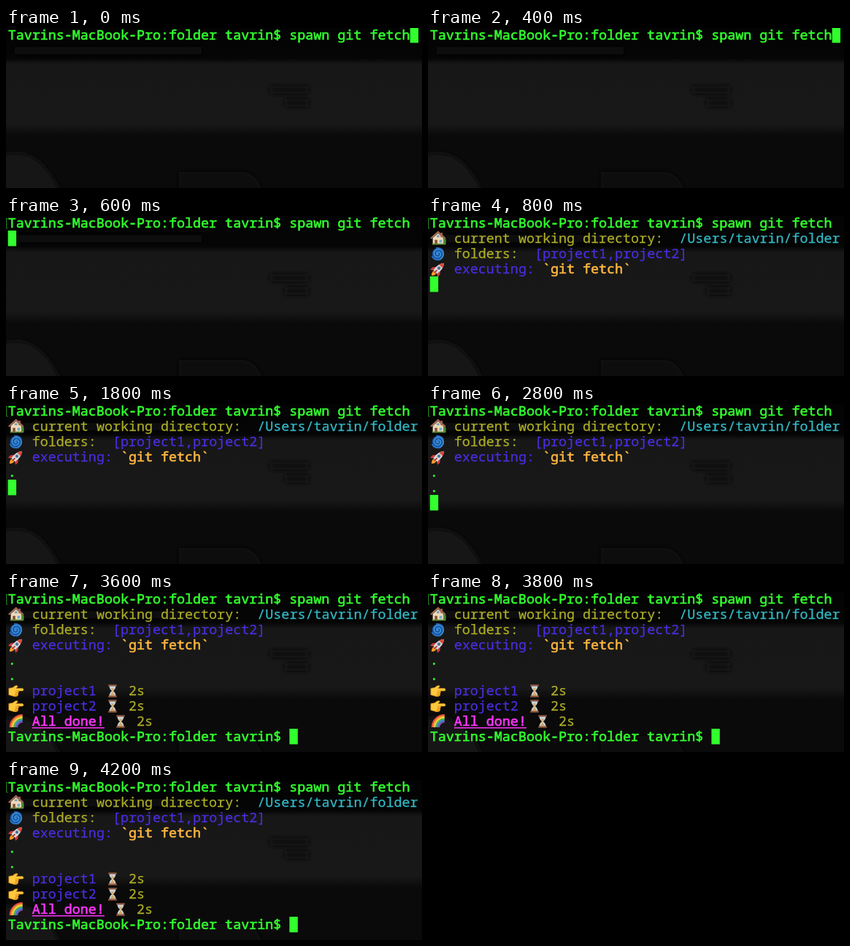
An HTML page for the animation above (4.4 s loop, 570x220 px).

```html
<!DOCTYPE html>
<html lang="en">
<head>
<meta charset="utf-8">
<title>Terminal session</title>
<style>
  html, body { margin: 0; width: 100%; height: 100%; overflow: hidden; background: #050505; }
  svg { display: block; width: 570px; height: 220px; }
  text { font: 18.367px "Noto Sans Mono", "DejaVu Sans Mono", monospace; white-space: pre; }
</style>
</head>
<body>
<svg viewBox="0 0 570 220" xmlns="http://www.w3.org/2000/svg">
  <defs>
    <filter id="soft" x="-20%" y="-50%" width="140%" height="200%"><feGaussianBlur stdDeviation="3"/></filter>
    <linearGradient id="back" x1="0" y1="0" x2="0" y2="220" gradientUnits="userSpaceOnUse">
      <stop offset="0" stop-color="#030303"/>
      <stop offset=".19" stop-color="#050505"/>
      <stop offset=".225" stop-color="#171717"/>
      <stop offset=".6" stop-color="#181818"/>
      <stop offset=".67" stop-color="#0a0a0a"/>
      <stop offset="1" stop-color="#0a0a0a"/>
    </linearGradient>

    <!-- Icons are drawn around their own centre -->
    <g id="house">
      <path d="M7 9V2q3-5 5 0V9z" fill="#4f8a35"/>
      <path d="M-8-1 0-8 8-1V9H-8z" fill="#ead9b9"/>
      <path d="M4-9h3v7H4z" fill="#a5553d"/>
      <path d="M-11 0 0-10 11 0" fill="none" stroke="#a06a55" stroke-width="2.6"/>
      <path d="M-5 2h4v7h-4z" fill="#86512f"/>
      <path d="M2 2h4v4H2z" fill="#6cacd2"/>
      <path d="M-2-5h4v3h-4z" fill="#709fb9"/>
      <path d="M-9 8.5H11" stroke="#5c8c38" stroke-width="2"/>
    </g>
    <g id="swirl" fill="none" stroke-linecap="round">
      <circle r="9" fill="#174f9d"/>
      <path id="coil" stroke="#3b8fd6" stroke-width="2"/>
      <path d="M-9 4Q-5 10 3 9M8-4Q5-9-2-9" stroke="#286fc6" stroke-width="2"/>
    </g>
    <g id="rocket" transform="rotate(45)">
      <path d="M-2.5 6Q-4 10 0 14 4 10 2.5 6z" fill="#ff9e25"/>
      <path d="M-4-1-8 4v5l5-3zM4-1 8 4v5L3 6z" fill="#d13e37"/>
      <path d="M0-13Q-6-6-4 6H4Q6-6 0-13z" fill="#d5dbe1"/>
      <path d="M0-13Q-3-9-4-6H4Q3-9 0-13z" fill="#d84a40"/>
      <circle cy="-2" r="2.2" fill="#3c6789" stroke="#7d8994"/>
      <path d="M0 2V8" stroke="#b73531" stroke-width="2"/>
    </g>
    <g id="hand" stroke="#d58a16" stroke-width=".7" fill="#ffc83d">
      <path d="M-11-4-5-5Q-1-9 2-8 4-7 0-4H10Q13-2 10 0H2L3 7Q1 9-4 8L-11 6z"/>
      <path d="M-1 0H3Q6 1.5 3 3H-1M-1 3H2.5Q5 4.5 2 6H-2M-2 6H1Q3 7 0 8.3H-4" fill="#f7b52c"/>
    </g>
    <g id="glass">
      <path d="M-5-8H5Q5-3 1 0 5 3 5 8H-5Q-5 3-1 0-5-3-5-8z" fill="#c8d3d8"/>
      <path d="M-3-4H3L0 0zM0 2 4 7H-4z" fill="#d9a35f"/>
      <path d="M0 0V4" stroke="#d9a35f"/>
      <path d="M-6.5-8.5h13M-6.5 8.5h13" stroke="#8a553b" stroke-width="2.4"/>
    </g>
    <g id="rainbow" fill="none" stroke-width="2.3"></g>
  </defs>

  <rect width="570" height="220" fill="url(#back)"/>
  <g filter="url(#soft)">
    <path d="M12 31H268" stroke="#0a0a0a" stroke-width="10"/>
    <path d="M362 85H414M382 103H414" stroke="#111" stroke-width="10"/>
    <path d="M-9 176Q22 166 42 181T76 229H-9z" fill="#121212"/>
    <path d="M237 198H325Q345 200 353 229H237z" fill="#111"/>
  </g>
  <g id="screen"></g>
  <path id="mark" d="M2.5 3.5H.5V17H2.5" fill="none" stroke="#1f8a1c"/>
  <rect id="cursor" width="11.4" height="21.4" fill="#32ff2e"/>
</svg>
<script>
const LOOP = 4400, CELL = 11.02, ROW = 21, LEFT = 2.7, ICON_SCALE = 0.9;
const GREEN = '#32ff2e', OLIVE = '#adad27', BLUE = '#492ee1',
      CYAN = '#33bbc8', ORANGE = '#fdb53e', PINK = '#f935f8';
const BOLD = [GREEN, ORANGE, PINK];
const NS = 'http://www.w3.org/2000/svg';
const byId = id => document.getElementById(id);
const screen = byId('screen');

function add(parent, tag, attrs) {
  const el = document.createElementNS(NS, tag);
  for (const key in attrs) el.setAttribute(key, attrs[key]);
  return parent.appendChild(el);
}

function spiral() {
  let d = '';
  for (let i = 0; i <= 60; i++) {
    const a = i * 0.25, r = i * 0.16;
    d += (i ? 'L' : 'M') + (r * Math.cos(a)).toFixed(2) + ' ' + (r * Math.sin(a)).toFixed(2);
  }
  return d;
}
byId('coil').setAttribute('d', spiral());

['#e8463f', '#f5a033', '#f4df45', '#53b44f', '#3f8ddd', '#8953ba'].forEach((stroke, i) => {
  const r = 19 - i * 2.1;
  add(byId('rainbow'), 'path', { d: `M${10 - r} 9A${r} ${r} 0 0 1 10 ${9 - r}`, stroke });
});

// Each part is [column, content, colour]; without a colour it names an icon.
const prompt = 'Tavrins-MacBook-Pro:folder tavrin$ ';
const lines = [
  [0, [0, prompt + 'spawn git fetch', GREEN]],
  [800, [0, 'house'], [3, 'current working directory:', OLIVE], [31, '/Users/tavrin/folder', CYAN]],
  [800, [0, 'swirl'], [3, 'folders:', OLIVE], [13, '[project1,project2]', BLUE]],
  [800, [0, 'rocket'], [3, 'executing:', BLUE], [14, '`git fetch`', ORANGE]],
  [1800, [0, '.', GREEN]],
  [2800, [0, '.', GREEN]],
  [3600, [0, 'hand'], [3, 'project1', BLUE], [12, 'glass'], [15, '2s', OLIVE]],
  [3600, [0, 'hand'], [3, 'project2', BLUE], [12, 'glass'], [15, '2s', OLIVE]],
  [3600, [0, 'rainbow'], [3, 'All done!', PINK], [13, 'glass'], [16, '2s', OLIVE]],
  [3600, [0, prompt, GREEN]]
];

function addText(group, x, y, content, fill) {
  const weight = BOLD.includes(fill) ? 0.6 : 0.25;
  add(group, 'text', { x, y, fill, stroke: fill, 'stroke-width': weight }).textContent = content;
  if (fill === PINK) add(group, 'rect', { x, y: y + 2, width: content.length * CELL, height: 1.5, fill });
}

const rows = lines.map(([start, ...parts], row) => {
  const group = add(screen, 'g', {});
  for (const [col, content, fill] of parts) {
    const x = LEFT + col * CELL, y = 16 + row * ROW;
    if (fill) addText(group, x, y, content, fill);
    else add(group, 'use', {
      href: '#' + content,
      transform: `translate(${x + CELL} ${y - 6}) scale(${ICON_SCALE})`
    });
  }
  return { start, group };
});

// [start, column, row]
const stops = [[0, 50, 0], [600, 0, 1], [800, 0, 4], [1800, 0, 5], [2800, 0, 6], [3600, 35, 9]];

function show(el, on) {
  el.setAttribute('visibility', on ? 'visible' : 'hidden');
}

function draw(t) {
  for (const { start, group } of rows) show(group, t >= start);
  show(byId('mark'), t >= 600);
  const [, col, row] = stops.filter(stop => t >= stop[0]).pop();
  byId('cursor').setAttribute('x', LEFT + col * CELL);
  byId('cursor').setAttribute('y', row * ROW - 1);
}

const begin = performance.now();
function tick() {
  draw((performance.now() - begin) % LOOP);
  requestAnimationFrame(tick);
}
tick();
</script>
</body>
</html>
```
